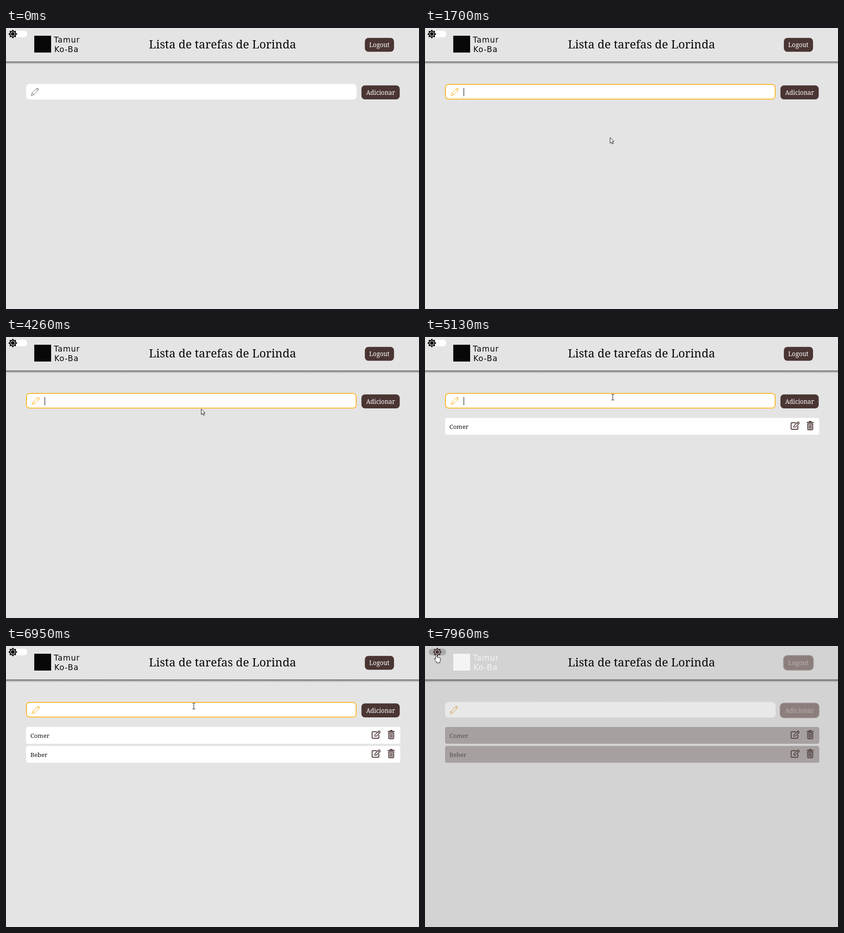
An HTML page for the animation above (7.99 s loop, 906x618 px).

```html
<!DOCTYPE html>
<html lang="pt">
<head>
<meta charset="utf-8">
<title>Lista de tarefas</title>
<style>
  html, body { margin: 0; width: 100%; height: 100%; overflow: hidden; background: #e4e4e4; }
  svg { display: block; width: 906px; height: 618px; }
  text { font-family: "Noto Serif", serif; font-size: 13.3px; }
  .page { fill: var(--page); }
  .title { font-size: 25.3px; text-anchor: middle; fill: #080808; }
  .brand text { font: 17px "DejaVu Sans", sans-serif; letter-spacing: 1px; }
  .brand { fill: var(--brand); }
  .button rect { fill: var(--button); stroke: var(--edge); stroke-width: 1.6px; }
  .button text { fill: var(--label); text-anchor: middle; font-size: 13.5px; }
  .card { fill: var(--card); }
  .task text { fill: var(--task); }
  .icon { fill: none; stroke: var(--icon); stroke-width: 1.9px; stroke-linejoin: round; stroke-linecap: round; }
  #typed { font: 13.333px "Noto Sans", "Open Sans", sans-serif; fill: #111; }
  #key { font: bold 46px "Liberation Sans", sans-serif; fill: #858585; text-anchor: middle; }
  #arrow, #hand { fill: #fff; stroke: #111; stroke-width: 1px; stroke-linejoin: round; }
</style>
</head>
<body>
<svg id="stage" viewBox="0 0 906 618">
  <defs>
    <linearGradient id="shade" x2="0" y2="1">
      <stop offset="0" stop-color="#000" stop-opacity=".68"/>
      <stop offset=".25" stop-color="#000" stop-opacity=".45"/>
      <stop offset=".5" stop-color="#000" stop-opacity=".22"/>
      <stop offset="1" stop-color="#000" stop-opacity="0"/>
    </linearGradient>
    <g id="tools">
      <path class="icon" d="M813 188.5H805Q803.2 188.5 803.2 190.3V201.2Q803.2 203 805 203H816.2Q818 203 818 201.2V196"/>
      <path class="icon" style="stroke-width:1.6px" d="M809 198.5L809.5 195.2L817.6 187.1Q818.4 186.3 819.2 187.1L820.7 188.6Q821.5 189.4 820.7 190.2L812.5 198.2ZM816 188.7L819.1 191.8"/>
      <path class="icon" d="M838 188H852M842 187.5L843.3 185.8H846.7L848 187.5M839.5 191V202.5Q839.5 204 841 204H849Q850.5 204 850.5 202.5V191Z"/>
      <path class="icon" style="stroke-width:1.6px" d="M842.5 193.5V201.5M845 193.5V201.5M847.5 193.5V201.5"/>
    </g>
  </defs>

  <rect class="page" width="906" height="618"/>
  <rect y="73.5" width="906" height="6.5" fill="url(#shade)"/>
  <rect class="page" width="906" height="73.5"/>

  <g id="overlay">
    <rect x="361" width="123" height="31.5" fill="#898989"/>
    <path d="M388 0H458V11Q458 17 452 17H394Q388 17 388 11Z" fill="#fff"/>
    <text id="key" x="424" y="4"></text>
  </g>

  <rect x="8" y="6" width="38.5" height="14.5" rx="7.25" fill="var(--track)"/>
  <g id="sun"></g>

  <g class="brand">
    <rect x="62" y="17" width="37" height="37"/>
    <text x="105" y="31.5">Tamur</text>
    <text x="106" y="53">Ko-Ba</text>
  </g>
  <text class="title" x="475" y="45">Lista de tarefas de Lorinda</text>

  <g class="button">
    <rect x="786.4" y="20.9" width="65.6" height="32.2" rx="8.5"/>
    <text x="819" y="41.8">Logout</text>
  </g>
  <g class="button">
    <rect x="778.9" y="125.5" width="85.6" height="32.4" rx="8.5"/>
    <text x="821.7" y="147">Adicionar</text>
  </g>

  <rect x="44" y="123.3" width="725" height="34" rx="7.5" fill="var(--field)"/>
  <rect id="focus" x="44.8" y="124.2" width="723.4" height="32.2" rx="6.8" fill="none" stroke="#ffae0d" stroke-width="1.7"/>
  <path id="pencil" fill="none" stroke-linejoin="round"
    d="M55.3 148.7L57 143.2L66.3 133.7Q67.3 132.7 68.7 133L70.8 133.2L71 135.2Q71 136.7 70 137.7L60.7 147ZM57 143.2Q59.5 144 60.7 147M65.5 134.5L69.6 138M67.8 132.9L70.8 135.7"/>
  <text id="typed" x="84" y="146"></text>
  <rect id="caret" y="132" width="1.2" height="18" fill="#222"/>

  <g class="task" id="first">
    <rect class="card" x="44" y="178" width="821" height="37" rx="4.5"/>
    <text x="53.5" y="202">Comer</text>
    <use href="#tools"/>
  </g>
  <g class="task" id="second" transform="translate(0 41.7)">
    <rect class="card" x="44" y="178" width="821" height="37" rx="4.5"/>
    <text x="53.5" y="202">Beber</text>
    <use href="#tools"/>
  </g>

  <g id="cursor">
    <path id="arrow" d="M.5 .5V13L3.4 10.3L5.3 14.7L7.5 13.8L5.6 9.5H9.3Z"/>
    <path id="beam" fill="none" stroke="#222" stroke-width="1.1" d="M-3 -6H-1Q0 -6 0 -5Q0 -6 1 -6H3M0 -5V6M-3 6.5H-1Q0 6.5 0 5.5Q0 6.5 1 6.5H3"/>
    <path id="hand" d="M-1.5 10V1Q-1.5 -.5 0 -.5Q1.5 -.5 1.5 1V6Q3 4.8 4 6.3Q5.5 5.3 6.500 7Q8.7 6.3 8.7 9V12Q8.7 14 7.5 15.5V18H.5V16L-4.5 10.5Q-5 8.5 -3.5 8.3Z"/>
  </g>
  <circle id="halo" cx="302" cy="141" r="11.5" fill="#ff0" fill-opacity=".5"/>
</svg>

<script>
const LOOP = 7990, CLICK = 7790;
const $ = id => document.getElementById(id);
const root = $('stage');

// [time, x, y]
const path = [
  [200, 812, 603], [290, 745, 575], [350, 685, 540], [420, 628, 502],
  [490, 568, 465], [560, 508, 385], [620, 460, 315], [690, 403, 248],
  [750, 375, 203], [850, 335, 160], [970, 306, 143], [1030, 304, 142],
  [1470, 304, 142], [1560, 345, 188], [1650, 380, 218], [1800, 455, 284],
  [1930, 491, 314], [4140, 491, 314], [4200, 462, 238], [4260, 428, 158],
  [4350, 411, 122], [4500, 409, 125], [4800, 412, 132],
  [6980, 412, 132], [7100, 350, 116], [7250, 200, 72], [7400, 75, 38],
  [7520, 15, 23], [7620, 20, 21], [7720, 25, 19]
];
const typing = [
  [0, ''], [2370, 'C'], [2600, 'Co'], [2800, 'Com'], [2930, 'Come'], [3090, 'Comer'],
  [3940, ''], [5450, 'B'], [5620, 'Be'], [5800, 'Beb'], [5930, 'Bebe'], [6030, 'Beber'], [6610, '']
];
const keys = [[0, 'c'], [2530, 'a'], [5280, 'b']];
const caretOn = [[1410, 1930], [2370, 3600], [4140, 4670], [5130, 6560]];
const overlayOn = [[2190, 3630], [5280, 6510]];

// name: [light, shade reached at the end of the loop]
const theme = {
  page: ['e4e4e4', 'd3d3d3'], field: ['ffffff', 'e8e8e8'], card: ['ffffff', 'a6a1a0'],
  task: ['161616', '555151'], button: ['4a3533', '8c7e7d'], edge: ['e4e4e4', 'a19594'],
  label: ['ffffff', 'b9b1b0'], icon: ['4a3533', '534140'], track: ['ffffff', 'aaaaaa'],
  sun: ['000000', '43302e']
};

const within = (t, spans) => spans.some(([a, b]) => t >= a && t < b);
const latest = (t, steps) => steps.filter(s => s[0] <= t).pop()[1];
const show = (id, on) => $(id).setAttribute('visibility', on ? 'visible' : 'hidden');
const move = (id, x, y) => $(id).setAttribute('transform', `translate(${x} ${y})`);

function mix([a, b], k) {
  const part = (s, i) => parseInt(s.slice(i, i + 2), 16);
  return `rgb(${[0, 2, 4].map(i => Math.round(part(a, i) + (part(b, i) - part(a, i)) * k))})`;
}

function place(t) {
  const i = path.findIndex(p => p[0] > t);
  if (i < 0) return path[path.length - 1].slice(1);
  if (i === 0) return path[0].slice(1);
  const [ta, xa, ya] = path[i - 1], [tb, xb, yb] = path[i];
  const k = (t - ta) / (tb - ta);
  return [xa + (xb - xa) * k, ya + (yb - ya) * k];
}

function buildSun() {
  let d = '';
  for (let i = 0; i < 16; i++) {
    const r = i % 2 ? 6.8 : 10, a = i * Math.PI / 8;
    d += `${i ? 'L' : 'M'}${(r * Math.cos(a)).toFixed(2)} ${(r * Math.sin(a)).toFixed(2)}`;
  }
  $('sun').innerHTML = `<path d="${d}Z" fill="var(--sun)"/>
    <circle r="4.6" fill="var(--sun)" stroke="var(--page)" stroke-width="1.3"/>`;
}

function drawCursor(t) {
  const [x, y] = place(t);
  const hand = x < 47 && y < 30;
  const beam = x > 44 && x < 769 && y > 123 && y < 157;
  move('cursor', x, y);
  show('arrow', t >= 200 && !hand && !beam);
  show('beam', t >= 200 && beam);
  show('hand', hand);
  show('halo', t >= 1410 && t < 1500);
}

function drawField(t) {
  const focused = t >= 1450 && t < CLICK;
  const text = latest(t, typing);
  show('focus', focused);
  move('pencil', focused ? 2 : 0, 0);
  $('pencil').setAttribute('stroke', focused ? '#ffae0d' : t < CLICK ? '#666' : '#d3993c');
  $('typed').textContent = text;
  const width = text ? $('typed').getComputedTextLength() : 0.6;
  $('caret').setAttribute('x', (focused ? 84 : 81.6) + width);
  show('caret', within(t, caretOn));
}

function render(t) {
  const k = Math.min(1, Math.max(0, (t - CLICK) / 170));
  for (const name in theme) root.style.setProperty('--' + name, mix(theme[name], k));
  root.style.setProperty('--brand', t < CLICK ? '#080808' : '#f4f4f4');
  move('sun', 15 + 12 * k, 13.3);
  show('overlay', within(t, overlayOn));
  $('key').textContent = latest(t, keys);
  show('first', t >= 4290);
  show('second', t >= 6950);
  drawField(t);
  drawCursor(t);
}

buildSun();
const start = performance.now();
function tick() {
  render((performance.now() - start) % LOOP);
  requestAnimationFrame(tick);
}
tick();
</script>
</body>
</html>
```
